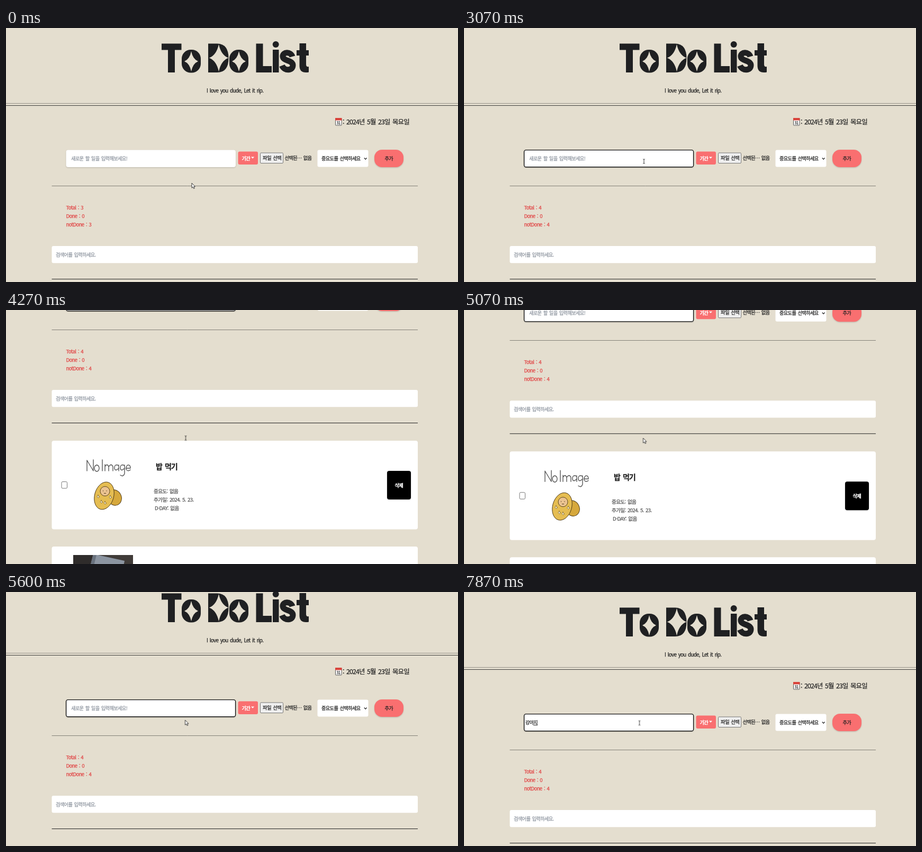
An HTML page that plays this animation: 854 by 480 pixels, repeating every 8 s.

```html
<!DOCTYPE html>
<html lang="ko">
<head>
<meta charset="utf-8">
<title>To Do List</title>
<style>
  html, body { margin: 0; width: 100%; height: 100%; overflow: hidden; background: #e4decf; }
  svg { display: block; width: 100vw; height: 100vh; }
  text {
    --ink: #222;
    font: 500 9.2px "Noto Sans CJK KR", "Noto Sans CJK", sans-serif;
    letter-spacing: -.07em; word-spacing: .15em;
    fill: var(--ink); stroke: var(--ink); stroke-width: .25px;
  }
  .hint { --ink: #9097a1; }
  .bold { font-weight: 700; }
  .white { --ink: #fff; }
  .stats text { --ink: #e04646; font-size: 9.6px; }
  .meta text { --ink: #555; font-size: 9.6px; }
  .coral { fill: #f96f70; }
  .paper { fill: #fff; }
  .raised { filter: drop-shadow(0 1.5px 1px rgb(0 0 0 / .18)); }
  #composing { text-decoration: underline; }

  #page, #pointer, #focus, #arrow, #beam { animation: 8s linear infinite; }
  #page { animation-name: scroll; }
  #pointer { animation-name: move; }
  #focus { animation-name: focus; animation-timing-function: step-end; }
  #arrow { animation-name: arrow; animation-timing-function: step-end; }
  #beam { animation-name: beam; animation-timing-function: step-end; }

  /* the wheel moves the page in jumps of about 67 ms */
  @keyframes scroll {
    0% { transform: translateY(0); }
    47.37% { transform: translateY(0); animation-timing-function: steps(4, start); }
    50.7% { transform: translateY(-4px); animation-timing-function: steps(4, start); }
    54.04% { transform: translateY(-261px); animation-timing-function: steps(1, start); }
    54.9% { transform: translateY(-274px); }
    63.25% { transform: translateY(-274px); animation-timing-function: steps(4, start); }
    66.54% { transform: translateY(-141px); animation-timing-function: steps(5, start); }
    70.69% { transform: translateY(-27px); animation-timing-function: steps(1, start); }
    71.5%, 100% { transform: translateY(0); }
  }
  @keyframes move {
    0%, .5% { transform: translate(352px, 293px); animation-timing-function: ease-in-out; }
    7%, 47.2% { transform: translate(340px, 252px); }
    49%, 74.4% { transform: translate(339.5px, 242px); }
    76.6%, 100% { transform: translate(331.5px, 247.5px); }
  }
  @keyframes focus { 0% { opacity: 0; } 7.4%, 100% { opacity: 1; } }
  @keyframes arrow { 0% { opacity: 1; } 5% { opacity: 0; } 58.3% { opacity: 1; } 75.8%, 100% { opacity: 0; } }
  @keyframes beam { 0% { opacity: 0; } 5% { opacity: 1; } 58.3% { opacity: 0; } 75.8%, 100% { opacity: 1; } }
</style>
</head>
<body>
<svg viewBox="0 0 854 480">
  <defs>
    <path id="star" d="M0-19Q3-4 13 0Q3 4 0 19Q-3 4-13 0Q-3-4 0-19Z" fill="#e4decf"/>
    <path id="spot" d="M0-3L1 0L3 1L0 3L-2 1Z" fill="#f6ecd2" stroke="#6b5320" stroke-width=".7"/>
    <clipPath id="photo"><path d="M127 724h113v135h-113z"/></clipPath>
  </defs>

  <g id="page">
    <!-- heading -->
    <g role="img" aria-label="To Do List" fill="#1f2022">
      <path d="M294 29.5h37.5v12H319V84h-13V41.5h-12z"/>
      <rect x="332" y="41" width="36" height="43.5" rx="17"/>
      <path d="M382 29.5h17Q420.5 30 420.5 57T399 84h-17z"/>
      <rect x="422" y="41" width="36" height="43.5" rx="17"/>
      <path d="M472.5 29.5h13V72H502V84h-29.5zM504 41h11.5V84H504z"/>
      <circle cx="509.7" cy="31" r="6"/>
      <path d="M541 54C538 44 523 45 523 53.5C523 63 542 60 542 70.5C542 81 526 82 521.5 71" fill="none" stroke="#1f2022" stroke-width="11"/>
      <path d="M554.5 29H567V42h5v10h-5V69q0 5 5 4V83.5q-17.5 3-17.5-12V52H549V42h5.5z"/>
      <use href="#star" transform="translate(350 63)"/>
      <use href="#star" transform="translate(402 56.5) scale(1.4 1.36)"/>
      <use href="#star" transform="translate(440 63)"/>
    </g>
    <text x="379" y="122" style="font-size:9.8px">I love you dude, Let it rip.</text>
    <path d="M0 142.5H854" stroke="#222" opacity=".4"/>
    <path d="M0 146.5H854" stroke="#222" opacity=".85"/>

    <!-- date -->
    <rect x="622.5" y="171" width="11.5" height="13" rx="1" class="paper" stroke="#555"/>
    <path d="M622 170h12.5v4.5H622z" fill="#d9433b"/>
    <text x="624.5" y="182" style="font-size:7px">31</text>
    <text x="636" y="181.5" style="font-size:12.4px">: 2024년 5월 23일 목요일</text>

    <!-- form -->
    <rect x="113.5" y="230.5" width="320.5" height="32.5" rx="4" class="paper raised"/>
    <rect id="focus" x="113.6" y="230.6" width="320" height="32.2" rx="3.5" fill="none" stroke="#111" stroke-width="1.4"/>
    <text id="hint" class="hint" x="123" y="250">새로운 할 일을 입력해보세요!</text>
    <text x="116" y="250" style="font-size:9px"><tspan id="done"></tspan><tspan id="composing"></tspan></text>

    <rect x="438.5" y="233.5" width="37.5" height="24.5" rx="3" class="coral"/>
    <text class="bold white" x="445.5" y="249.5">기간</text>
    <path d="M463 243.5h6l-3 3.2z" class="paper"/>

    <rect x="480.5" y="236" width="43" height="19.5" rx="1.5" fill="#efefef" stroke="#767676"/>
    <text x="485" y="249" style="font-size:9.4px">파일 선택</text>
    <text x="526.5" y="249">선택된… 없음</text>

    <rect x="588.5" y="230.5" width="96" height="32" rx="3" class="paper"/>
    <text x="596" y="250">중요도를 선택하세요</text>
    <path d="M676.8 245.5l2.4 2.6l2.4-2.6" fill="none" stroke="#222" stroke-width="1.3"/>

    <rect x="696" y="230" width="55" height="33" rx="14.5" class="coral raised"/>
    <text x="715.5" y="250">추가</text>

    <path d="M86.5 298.5H778" stroke="#222" opacity=".5"/>

    <g class="stats">
      <text x="113.5" y="342.5">Total : <tspan class="count">3</tspan></text>
      <text x="113.5" y="358.5">Done : 0</text>
      <text x="113.5" y="374.5">notDone : <tspan class="count">3</tspan></text>
    </g>

    <rect x="86.5" y="412" width="691.5" height="32.3" rx="3" class="paper"/>
    <text class="hint" x="94" y="432">검색어를 입력하세요.</text>
    <path d="M86.5 474.5H778" stroke="#222"/>

    <!-- first task -->
    <rect x="86.5" y="508" width="691.5" height="167.5" rx="4" class="paper"/>
    <rect x="105" y="585.5" width="10.5" height="12.5" rx="2" class="paper" stroke="#767676"/>
    <g transform="translate(0 261)">
      <path fill="none" stroke="#555" stroke-width="1.4" stroke-linecap="round" stroke-linejoin="round"
        d="M153 304V284L165 304V283M171.5 293a4.5 6 0 1 0 .1 0M182 283V304
           M187 304V292M187 296Q191 289 194 296V304M194 296Q199 289 202 296V304
           M213 294Q205 290 205 299Q206 306 213 299M213 293V304
           M224 294Q216 290 216 299Q217 306 224 299M224 293V309Q222 316 216 312
           M227 299H235Q235 292 230 293Q226 296 227 301Q230 306 235 302"/>
      <g stroke="#4a3614" stroke-width=".9">
        <ellipse cx="205" cy="354.5" rx="13" ry="15" transform="rotate(-25 205 354.5)" fill="#d6a83c"/>
        <ellipse cx="185.5" cy="351" rx="18" ry="26.5" transform="rotate(16 185.5 351)" fill="#e5bd52"/>
        <circle cx="187" cy="342.5" r="9" fill="#ebc391"/>
      </g>
      <path d="M183.5 341v1.5M190 341v1.5M185 346q2 1.5 4 0" fill="none" stroke="#4a3518"/>
      <use href="#spot" x="174" y="352"/>
      <use href="#spot" x="180" y="362"/>
      <use href="#spot" x="187" y="364"/>
      <use href="#spot" x="197" y="353"/>
    </g>
    <text class="bold" x="283" y="562" style="font-size:14px">밥 먹기</text>
    <g class="meta">
      <text x="279" y="606.5">중요도: 없음</text>
      <text x="279" y="622.5">추가일: 2024. 5. 23.</text>
      <text x="281" y="638.5">D-DAY: 없음</text>
    </g>
    <rect x="720" y="565" width="45" height="54" rx="4" class="raised"/>
    <text class="bold white" x="734.5" y="595.5">삭제</text>

    <!-- second task -->
    <rect x="86.5" y="708" width="691.5" height="167.5" rx="4" class="paper"/>
    <g clip-path="url(#photo)">
      <path d="M127 724h113v135h-113z" fill="#403b38"/>
      <path d="M127 724h37l-8 30h-29z" fill="#2f2c2b"/>
      <path d="M165 722l59 13l-22 110l-64-14z" fill="#8c95a1"/>
      <path d="M165 722l6 1.3l-26 110l-7-2z" fill="#69727e"/>
    </g>
  </g>

  <g id="pointer">
    <path id="arrow" d="M-1 0V9.3L1.2 7.3L2.7 10.5L4.3 9.8L2.9 6.7H5.3Z" fill="#fff" stroke="#222" stroke-width=".9"/>
    <path id="beam" d="M-1.7-4.3Q0-4.3 0-3Q0-4.3 1.7-4.3M0-3V3M-1.7 4.3Q0 4.3 0 3Q0 4.3 1.7 4.3" fill="none" stroke="#222" stroke-width=".9"/>
  </g>
</svg>
<script>
  const LOOP = 8000, ADDED = 3070;
  // time, committed text, syllable being composed
  const keys = [
    [0, '', ''], [1530, '', '바'], [1670, '', '밥'], [1870, '밥\u00a0', ''],
    [2070, '밥\u00a0', 'ㅁ'], [2130, '밥\u00a0', '머'], [2470, '밥\u00a0', '먹'],
    [2670, '밥\u00a0먹', 'ㄱ'], [2800, '밥\u00a0먹', '기'], [ADDED, '', ''],
    [7130, '', 'ㄱ'], [7200, '', '가'], [7400, '', '강'],
    [7530, '강', 'ㅇ'], [7600, '강', '아'], [7800, '강아', 'ㅈ'], [7870, '강아', '지']
  ];
  const byId = id => document.getElementById(id);
  const hint = byId('hint'), done = byId('done'), composing = byId('composing');
  const counts = document.querySelectorAll('.count');
  let start;

  function draw(now) {
    start ??= now;
    const t = (now - start) % LOOP;
    const [, text, syllable] = keys.filter(k => k[0] <= t).pop();
    done.textContent = text;
    composing.textContent = syllable;
    hint.style.opacity = text || syllable ? 0 : 1;
    counts.forEach(c => c.textContent = t < ADDED ? 3 : 4);
    requestAnimationFrame(draw);
  }
  requestAnimationFrame(draw);
</script>
</body>
</html>
```
